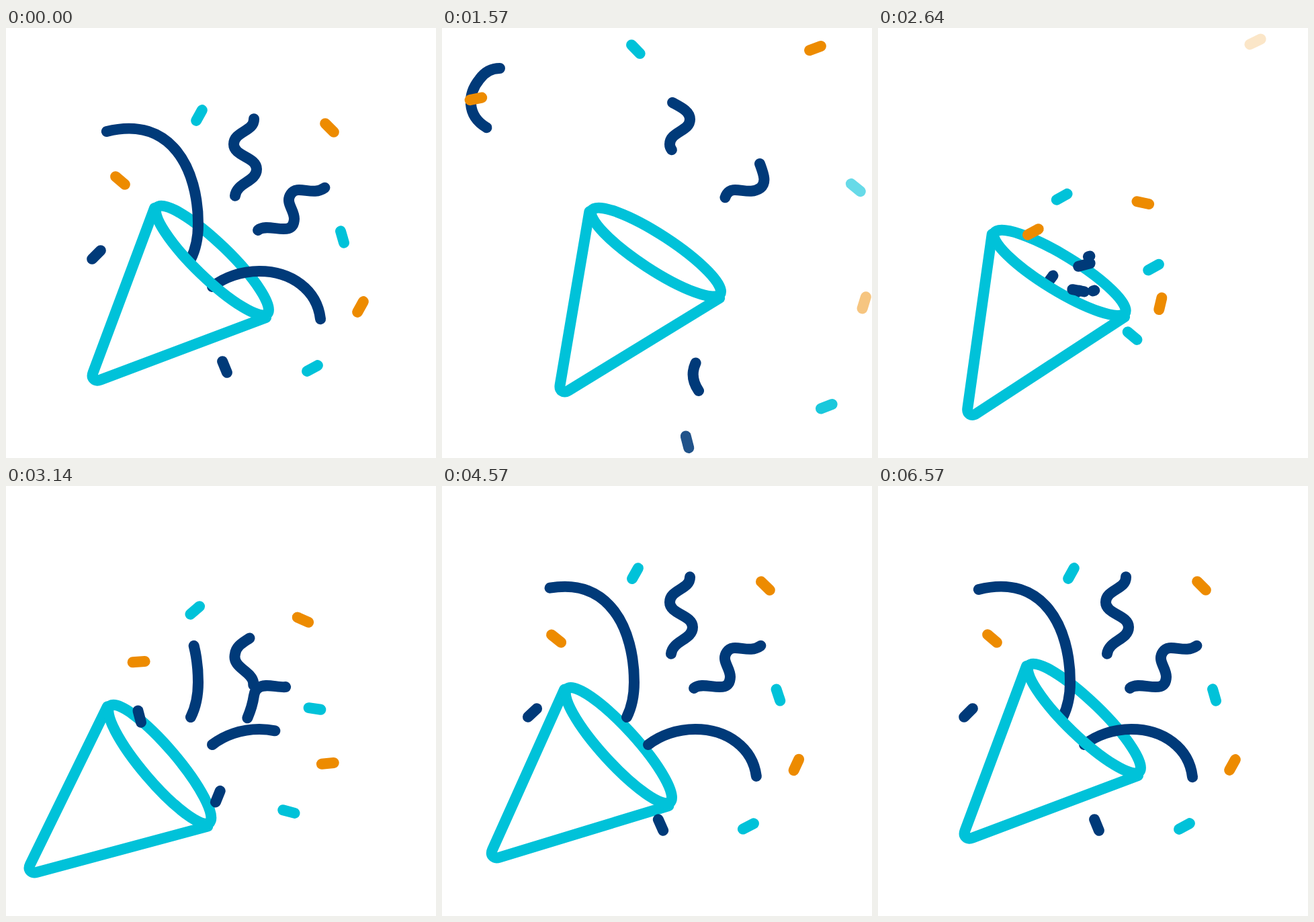
An HTML page for the animation above (6.64 s loop, 640 px wide and 640 px high).

```html
<!DOCTYPE html>
<html lang="en">
<head>
<meta charset="utf-8">
<title>Party popper</title>
<style>
  html, body { margin: 0; width: 100%; height: 100%; overflow: hidden; background: #fff; }
  svg { display: block; width: 100%; height: 100%; }
  path { fill: none; stroke-width: 16; stroke-linecap: round; stroke-linejoin: round; }
  .teal { stroke: #00c2d9; }
  .navy { stroke: #003a79; }
  .orange { stroke: #ed8b00; }
</style>
</head>
<body>
<svg viewBox="0 0 640 640">
  <g class="cone">
    <path class="teal" d="M221 268L129.5 513C126.5 521 132 527 141 523.5L387 431"/>
    <path class="teal" d="M225 266.8A114 26 44 0 1 389 425.2"/>
  </g>
  <g id="streamers"></g>
  <g class="cone">
    <path class="teal" d="M225 266.8A114 26 44 0 0 389 425.2"/>
  </g>
  <g id="confetti"></g>
</svg>
<script>
const LOOP = 6640, STEP = LOOP / 93;
const BURST = 2490, LAUNCH = 2640, ARRIVE = 4800;
const FADE = 350;
const SWIRL = 3;                       // degrees a heading turns on each side of rest
const MOUTH = { x: 307, y: 346 };
const ORIGIN = { x: 300, y: 390 };     // where the confetti comes from

// tilt, heading and spin in degrees; far is the drift distance, life its duration
const pieces = [
  { color: "teal",   x: 287.5, y: 130,   tilt: -61, heading: -86.5,  spin: 32,   far: 100, life: 2100 },
  { color: "orange", x: 481.5, y: 148.5, tilt: 45,  heading: -55,    spin: -33,  far: 151, life: 2717 },
  { color: "orange", x: 170,   y: 227,   tilt: 40,  heading: -131.5, spin: -69,  far: 177, life: 2350 },
  { color: "teal",   x: 500.5, y: 311,   tilt: 74,  heading: -29.5,  spin: -103, far: 137, life: 1780 },
  { color: "orange", x: 527.5, y: 415,   tilt: 119, heading: -0.5,   spin: -196, far: 101, life: 1745 },
  { color: "teal",   x: 456,   y: 506.5, tilt: -29, heading: 29,     spin: 69,   far: 130, life: 1885 },
  { color: "navy",   x: 134.5, y: 337.5, tilt: -45, heading: 182,    spin: 211,  far: 120, life: 1430, late: true },
  { color: "navy",   x: 325.5, y: 504.5, tilt: 68,  heading: 73.5,   spin: -238, far: 119, life: 1875, late: true }
];

// At rest a streamer shows its path from node `tail` to node `head`.
const curl = { tail: 1, head: 3, launch: 2570, tailBy: 3200, pull: 1 };
const squiggle = { tail: 2, head: 5, launch: 2630, tailBy: 4700, headBy: 4700, pull: 2.4, gone: 2100 };
const streamers = [
  { ...curl, headBy: 5500, gone: 2080,
    d: "M246 388C258 372 269 358 275 344C283 328 286 308 286 292C286 210 246 130 150 154" +
       "C120 162 90 164 66 148C36 130 38 98 56 76C64 65 74 60 86 60" },
  { ...curl, headBy: 5000, gone: 1785,
    d: "M283 402C291 397 299 391 307 385C325 371 350 362 377 362C425 362 463 390 468 433" +
       "C474 488 392 462 377 500C371 514 373 527 382 540" },
  { ...squiggle,
    d: "M311 341C330 335 372 318 368 292C366 276 336 270 341 250C343 230 373 229 373 210" +
       "C373 192 339 191 339 173C339 154 369 154 369 136C369 124 356 118 343 111" },
  { ...squiggle,
    d: "M318 392C345 385 365 340 369 312C370 306 372 303 375 301C390 288 428 314 429 284" +
       "C429 270 415 260 424 247C434 232 456 251 474 238C484 230 478 216 473 202" }
];

const span = (t, from, to) => Math.min(1, Math.max(0, (t - from) / (to - from)));
const easeOut = (u, power) => 1 - (1 - u) ** power;
const smooth = u => u * u * (3 - 2 * u);
const mix = (a, b, u) => a + (b - a) * u;

function addPath(parent, color, d) {
  const path = document.createElementNS("http://www.w3.org/2000/svg", "path");
  path.setAttribute("class", color);
  path.setAttribute("d", d);
  return parent.appendChild(path);
}

const cones = document.querySelectorAll(".cone");
const streamerLayer = document.getElementById("streamers");
const confettiLayer = document.getElementById("confetti");

for (const s of streamers) {
  s.path = addPath(streamerLayer, "navy", s.d);
  s.total = s.path.getTotalLength();
  const curves = s.d.split("C");
  const lengthTo = node => {
    s.path.setAttribute("d", curves.slice(0, node + 1).join("C"));
    return s.path.getTotalLength();
  };
  s.restTail = lengthTo(s.tail);
  s.restHead = lengthTo(s.head);
  s.path.setAttribute("d", s.d);
}

for (const p of pieces) {
  const reach = Math.hypot(p.x - ORIGIN.x, p.y - ORIGIN.y);
  p.near = p.late ? reach : reach * 0.47;
  p.leaving = addPath(confettiLayer, p.color, "M-9 0H9");
  p.arriving = addPath(confettiLayer, p.color, "M-9 0H9");
}

// Lean forward, kick back on the burst, then settle
function drawCone(t) {
  const lean = easeOut(span(t, 0, 2350), 1.75);
  const recoil = span(t, 2430, 3250);
  const swing = smooth(span(t, 2600, 3300));
  const held = 1 - smooth(span(t, 3000, 6400));
  const pose = (aim, kick, u, left) => aim * lean * (1 - u) + kick * u * left;
  const x = MOUTH.x + pose(13.5, -79, easeOut(recoil, 2.6), held);
  const y = MOUTH.y + pose(-14.5, 72, easeOut(recoil, 1.6), held);
  const angle = pose(-12.7, 8.4, swing, held ** 1.4);
  const move = `translate(${x} ${y}) rotate(${angle}) translate(${-MOUTH.x} ${-MOUTH.y})`;
  cones.forEach(g => g.setAttribute("transform", move));
}

function drawStreamer(s, t) {
  let tail, head;
  if (t < BURST) {
    tail = mix(s.restTail, s.total, span(t, 0, s.gone) ** s.pull);
    head = mix(s.restHead, s.total, easeOut(span(t, 0, 710), 1.5));
  } else {
    tail = s.restTail * easeOut(span(t, s.launch, s.tailBy), 3);
    head = s.restHead * easeOut(span(t, s.launch, s.headBy), 3);
  }
  s.path.style.display = head - tail > 0.5 ? "" : "none";
  s.path.setAttribute("stroke-dasharray", `${head - tail} 2000`);
  s.path.setAttribute("stroke-dashoffset", -tail);
}

function place(path, p, heading, distance, turn, opacity) {
  const a = heading * Math.PI / 180;
  const x = p.x + distance * Math.cos(a), y = p.y + distance * Math.sin(a);
  path.setAttribute("transform", `translate(${x} ${y}) rotate(${p.tilt + turn})`);
  path.setAttribute("opacity", opacity);
}

function drawPiece(p, t) {
  const drift = easeOut(span(t, 0, p.life), 3);
  const turn = (p.y - 470) * 0.22;     // higher pieces turn further
  const fade = 1 - span(t, p.life - FADE, p.life);
  place(p.leaving, p, p.heading - SWIRL, p.far * drift, turn * drift, fade);

  const left = (Math.max(0, ARRIVE - t) / (ARRIVE - LAUNCH)) ** (p.late ? 1.25 : 1);
  const shown = t >= (p.late ? LAUNCH : BURST) ? 1 : 0;
  place(p.arriving, p, p.heading + SWIRL, -p.near * left ** 3, p.spin * left ** 1.7, shown);
}

function draw(t) {
  drawCone(t);
  streamers.forEach(s => drawStreamer(s, t));
  pieces.forEach(p => drawPiece(p, t));
}

const begin = performance.now();
function tick() {
  const t = (performance.now() - begin) % LOOP;
  draw(Math.min(92, Math.floor(t / STEP + 0.1)) * STEP);
  requestAnimationFrame(tick);
}
tick();
</script>
</body>
</html>
```
